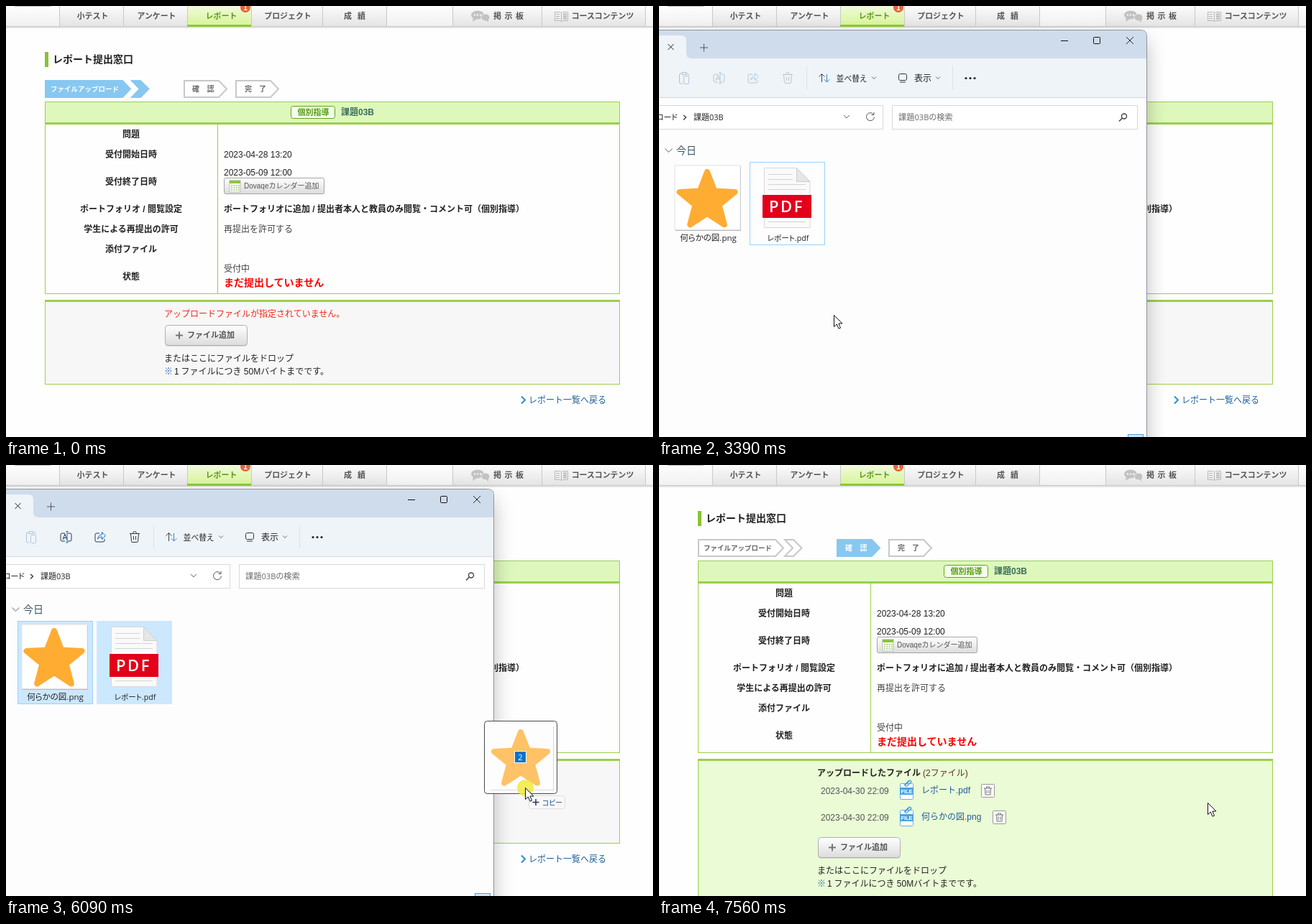
An HTML page that plays this animation: 900 by 600 pixels, repeating every 8 s.

```html
<!DOCTYPE html>
<html lang="ja">
<head>
<meta charset="utf-8">
<title>レポート提出</title>
<style>
html, body { margin: 0; width: 100%; height: 100%; overflow: hidden; background: #fefefe; }
svg { display: block; width: 900px; height: 600px; }
text { font-family: "Liberation Sans", "Noto Sans CJK JP", "Noto Sans CJK", sans-serif; white-space: pre; }
.b { font-weight: bold; }
.m { text-anchor: middle; }
.p { font-family: "Open Sans", "Noto Sans CJK JP", "Noto Sans CJK", sans-serif; font-feature-settings: "palt"; }
</style>
</head>
<body>
<svg id="stage" viewBox="0 0 900 600" xmlns="http://www.w3.org/2000/svg"></svg>
<script>
const GREEN = '#9bcf4c', BLUE = '#87c8f1', INK = '#222';

const text = (x, y, size, str, fill = INK, cls = '') =>
  `<text x="${x}" y="${y}" font-size="${size}" fill="${fill}" class="${cls}">${str}</text>`;
const rect = (x, y, w, h, fill, stroke = 'none', rx = 0, extra = '') =>
  `<rect x="${x}" y="${y}" width="${w}" height="${h}" fill="${fill}" stroke="${stroke}" rx="${rx}" ${extra}/>`;
const path = (d, stroke, fill = 'none', width = 1, extra = '') =>
  `<path d="${d}" stroke="${stroke}" fill="${fill}" stroke-width="${width}" ${extra}/>`;
const group = (id, body) => `<g id="${id}">${body}</g>`;
const gradient = (id, top, bottom) =>
  `<linearGradient id="${id}" x2="0" y2="1"><stop stop-color="${top}"/><stop offset="1" stop-color="${bottom}"/></linearGradient>`;

function star(cx, cy, r, fill) {
  const points = Array.from({ length: 10 }, (_, i) => {
    const a = i * Math.PI / 5, d = i % 2 ? r * .43 : r;
    return `${(cx + d * Math.sin(a)).toFixed(1)},${(cy - d * Math.cos(a)).toFixed(1)}`;
  });
  return `<polygon points="${points.join(' ')}" fill="${fill}" stroke="${fill}" stroke-width="8" stroke-linejoin="round"/>`;
}

function navigation() {
  const tab = (x, w, label, active) =>
    rect(x + .5, -2.5, w, 31, `url(#${active ? 'activeTab' : 'tab'})`, '#c9c9c9') +
    (active ? rect(x, 26, w + 1, 3, '#8cc63a') : '') + label;
  const name = (x, str, color = '#555') => text(x, 18, 10.9, str, color, 'b m');
  const bubbles = '<g fill="#c2c2c2"><ellipse cx="656" cy="12.5" rx="9" ry="6"/><path d="M650 16l-1 6 6-4z"/>' +
    '<g stroke="#f2f2f2"><ellipse cx="667" cy="16" rx="6" ry="5"/></g><path d="M668 20l3 3v-5z"/></g>' +
    '<g fill="#f5f5f5">' + [652, 656, 660].map(x => `<circle cx="${x}" cy="12.5" r="1.2"/>`).join('') + '</g>';
  const book = path('M763.5 8.5h7l2 1.5 2-1.5h7v12h-7l-2 1-2-1h-7zM772.5 10v11M765 11.5h5M765 14.5h5M765 17.5h5', '#b8b8b8') +
    path('M775 11.5h5M775 14.5h5M775 17.5h5', '#b8b8b8', 'none', 2);
  return rect(0, 0, 900, 28, 'url(#strip)') + rect(0, 28, 900, 1.5, '#c6c6c6') + rect(0, 29.5, 900, 1.5, '#e6e6e6') +
    rect(12, 0, 50, 1, '#bbb') +
    tab(74, 89, name(120.5, '小テスト')) + tab(163, 89, name(209.5, 'アンケート')) +
    tab(252, 89, name(299.5, 'レポート', '#5d9a1c'), true) +
    tab(341, 99, name(392, 'プロジェクト')) +
    tab(440, 89, text('470 489', 18, 11, '成績', '#555', 'b')) +
    tab(621, 124, bubbles + text('678 693.5 709', 18, 11, '掲示板', '#555', 'b')) +
    tab(745, 144, book + name(830, 'コースコンテンツ')) +
    '<circle cx="333" cy="2" r="7" fill="#e5663c"/>' + text(333, 6, 10, '1', '#fff', 'b m');
}

function steps(uploaded) {
  const shape = (d, on) => path(d, on ? BLUE : '#c8c8c8', on ? BLUE : '#fff', 2);
  const tone = on => on ? '#fff' : '#666';
  return shape('M55 104H162L173 115.5 162 127H55Z', !uploaded) +
    shape('M175 104H187L198.5 115.5 187 127H175L186 115.5Z', !uploaded) +
    text(62, 118.5, 9.5, 'ファイルアップロード', tone(!uploaded), 'b') +
    shape('M248 104H296L307 115.5 296 127H248Z', uploaded) +
    text('259 279.5', 119, 10, '確認', tone(uploaded), 'b') +
    shape('M320 104H368L379 115.5 368 127H320Z', false) +
    text('332 352', 119, 10, '完了', '#666', 'b');
}

function details() {
  const labels = [['問題', 183], ['受付開始日時', 211], ['受付終了日時', 249], ['ポートフォリオ / 閲覧設定', 287],
    ['学生による再提出の許可', 315], ['添付ファイル', 343], ['状態', 381]];
  const calendar = rect(311, 243, 15, 16, '#fff', '#bbb') + rect(311, 243, 15, 4, '#8cc63a') +
    path('M313 250h12M313 253h12M313 256h12', '#9cc96a', 'none', 1.5, 'stroke-dasharray="2 1.3"');
  return rect(54, 64, 5, 21, '#88c431') + text(65, 79, 14, 'レポート提出窓口', INK, 'b') +
    rect(54.5, 133.5, 799, 30, '#def8bb', GREEN) + rect(54.5, 164.5, 799, 236, '#fefefe', GREEN) +
    rect(54, 162, 800, 3, GREEN) + path('M294.5 165V401', GREEN) +
    rect(396.5, 139.5, 61, 17, '#f6fdea', '#62a31c', 3) + text(427.5, 152, 11, '個別指導', '#4f9a10', 'b m') +
    text(466, 152, 12, '課題03B', '#3b6e5a', 'b') +
    labels.map(([s, y]) => text(174, y, 12, s, INK, 'b m')).join('') +
    text(303, 211, 12, '2023-04-28 13:20') + text(303, 236, 12, '2023-05-09 12:00') +
    rect(303.5, 239.5, 139, 22, 'url(#button)', '#a5a5a5', 2) + calendar +
    text(331, 254, 10, 'Dovaqeカレンダー追加', '#555') +
    text(303, 287, 12, 'ポートフォリオに追加 / 提出者本人と教員のみ閲覧・コメント可（個別指導）', INK, 'b') +
    text(303, 315, 12, '再提出を許可する', '#444') + text(303, 370, 12, '受付中', '#444') +
    text(303, 390, 14, 'まだ提出していません', '#f00', 'b');
}

const panelFrame = (id, h) =>
  rect(54.5, 410.5, 799, h, '#f7f7f7', GREEN, 0, `id="${id}"`) + rect(54, 409, 800, 3, GREEN);

const addButton = dy => `<g transform="translate(0 ${dy})">` +
  rect(221.5, 445.5, 114, 28, '#bbb', 'none', 4) + rect(221.5, 444.5, 114, 28, 'url(#button)', '#b0b0b0', 4) +
  path('M236 458.5h10M241 453.5v10', '#777', 'none', 2) + text(252, 462, 11, 'ファイル追加', '#555', 'b') +
  text(220, 495, 12, 'またはここにファイルをドロップ') +
  text(220, 513, 12, '<tspan fill="#2b6ca8">※</tspan><tspan x="234">1</tspan><tspan x="243.5">ファイルにつき 50Mバイトまでです。</tspan>') + '</g>';

const dropPanel = () => panelFrame('dropBox', 116) +
  rect(61, 416, 787, 105, '#f3fde8', 'none', 0, 'id="glow"') +
  text(220, 433, 12, 'アップロードファイルが指定されていません。', '#f02818') + addButton(0) +
  path('M717 543.5l5 5-5 5', '#2a8fd5', 'none', 2) + text(727, 553, 12, 'レポート一覧へ戻る', '#1f5f96');

function filesPanel() {
  const row = (dy, name, binX) => `<g transform="translate(0 ${dy})">` + text(225, 458, 12, '2023-04-30 22:09', '#555') +
    rect(335.5, 443.5, 18, 22, '#fff', '#68aee0', 1) + rect(335, 449, 19, 10, '#4aa3e0') +
    text(344.5, 457, 7.5, 'FILE', '#fff', 'b m') +
    path('M341 446l6-6q3-2 4 1l-6 6q-3 1-2-2l5-5', '#3d9bd9', 'none', 1.2) +
    text(365, 457, 12, name, '#1e5c99') +
    `<g transform="translate(${binX} 444)">` + rect(.5, .5, 18, 18, '#fbfbfb', '#999', 1) +
    path('M4 6h11M7.5 6v-2h4v2M5.5 6l.5 9h7l.5-9M8 8.5v4.5M11 8.5v4.5', '#777') + '</g></g>';
  return panelFrame('filesBox', 220) +
    text(220, 433, 12, 'アップロードしたファイル', INK, 'b') + text(367, 433, 12, '(2ファイル)', '#5c3324') +
    row(0, 'レポート.pdf', 448) + row(37, '何らかの図.png', 464) + addButton(74);
}

function explorer() {
  const chevron = (x, y, s) => path(`M${x - s} ${y - s / 2}l${s} ${s} ${s} ${-s}`, '#666');
  const cross = (x, y, s) => path(`M${x - s} ${y - s}l${2 * s} ${2 * s}M${x - s} ${y + s}l${2 * s} ${-2 * s}`, INK);
  const icons = (line, accent) =>
    path('M82 95h-4q-2 0-2 2v7q0 2 2 2h4M86 95h3q2 0 2 2v7q0 2-2 2h-3M79 104l3-8 3 8M80 101.5h4', line) +
    path('M85 92.5v15.5M83.5 92.5h3M83.5 108h3', accent) +
    path('M130 95h-4q-2 0-2 2v8q0 2 2 2h9q2 0 2-2v-2', line) + path('M127.5 103q1-6 6-6v-3.5l5 5-5 5v-3.5q-4 0-6 3z', accent) +
    path('M172 95.5h14M176.5 95.5q0-3 2.5-3t2.5 3M173.5 95.5l1 11q0 1 1.5 1h6q1.5 0 1.5-1l1-11M177.5 99v5M180.5 99v5', line);
  const pdf = path('M146.5 225.5H191.5L210 244.5V308.5H146.5Z', '#d8d8d8', '#fafafa') +
    path('M191.5 225.5V244.5H210Z', '#cfcfcf', '#e6e6e6') +
    path('M152 234.5h34M152 241.5h34M152 248.5h52M152 255.5h52M152 300.5h52', '#d3d3d3') +
    rect(144, 263, 68, 32, '#e2001a') +
    `<text x="153" y="287" font-size="22" fill="#fff" letter-spacing="2.5" style="font-family:'Open Sans','Noto Sans',sans-serif;font-weight:600">PDF</text>`;
  return path('M-60 48H670Q678.5 48 678.5 56V660H-60Z', 'none', '#000', 0, 'id="shade" filter="url(#blur)"') +
    path('M-5 33.5H670Q678.5 33.5 678.5 42V640H-5Z', '#8e959c', '#fdfdfd') +
    path('M0 34H670Q678 34 678 42V73H0Z', 'none', '#e7e7e7', 0, 'id="titleBar"') +
    group('ribbon', '<path d="M0 41H31Q38 41 38 48V66Q38 73 45 73H0Z"/><rect y="73" width="678" height="54"/>') +
    rect(0, 127, 678, 1, '#d6d9dd') +
    cross(16.5, 57, 4) + path('M57 58h11M62.5 52.5v11', '#555') +
    path('M559 48.5h10', '#111') + rect(604.5, 43.5, 9, 9, 'none', '#111', 1) + cross(655, 48, 5) +
    path('M32 94h-2q-1.5 0-1.5 2v10q0 2 1.5 2h3M38 94h1.5q1.5 0 1.5 2v1M32 92.5h6v3h-6z', '#b8c2ca') +
    rect(34.5, 97.5, 7, 11, 'none', '#a9cbe6', 1) +
    group('iconsOff', icons('#bcc6cd', '#a9cbe6')) + group('iconsOn', icons('#2d3a46', '#0f6cbd')) +
    path('M205.5 84v32M408.5 84v32', '#dde1e5') +
    path('M226.5 106v-11M222.5 98.5l4-4 4 4', '#345') + path('M233.5 95v11M229.5 102l4 4 4-4', '#2e86c8') +
    text(246.5, 104.5, 10.8, '並べ替え', INK, 'p') + chevron(299, 100, 3) +
    rect(333.5, 94.5, 11, 9, 'none', '#333', 2) + path('M335 106h8', '#333') +
    text(355, 105, 12, '表示', INK, 'p') + chevron(388, 100, 3) +
    [427, 433, 439].map(x => `<circle cx="${x}" cy="100.5" r="1.6" fill="#222"/>`).join('') +
    rect(-5.5, 138.5, 317, 33, '#fff', '#d9d9d9') + rect(324.5, 138.5, 341, 33, '#fff', '#d9d9d9') +
    text(-4, 158.5, 10.8, 'ロード', INK, 'p') + path('M34 152l3.5 3-3.5 3.5', '#333', 'none', 1.3) +
    text(48, 158.5, 11, '課題03B', INK, 'p') + chevron(261, 154, 4) +
    path('M298.5 151a5.5 5.5 0 1 0 1 3.5M299 148v3.5h-3.5', '#555') +
    text(333, 158.5, 11.2, '課題03Bの検索', '#6a6a6a', 'p') +
    '<circle cx="647" cy="153.5" r="3.5" fill="none" stroke="#444" stroke-width="1.4"/>' + path('M644.5 156l-4.5 4.5', '#444', 'none', 1.6) +
    chevron(13.5, 201, 5) + text(24, 206, 14, '今日', '#3c5566', 'p') +
    rect(16.5, 217.5, 104, 115, '#cce8ff', '#99d1ff', 0, 'id="starItem"') +
    rect(126.5, 217.5, 104, 115, 'none', '#99d1ff', 0, 'id="pdfItem"') +
    rect(23, 223, 91, 90, '#bbb') + rect(22, 222, 91, 89.5, '#fff', '#e2e2e2') + star(67, 271.5, 40.5, '#ffac33') +
    pdf + text(68.5, 327, 11.5, '何らかの図.png', INK, 'p m') + text(179.5, 326.5, 10.6, 'レポート.pdf', INK, 'p m') +
    rect(652.5, 596.5, 21, 8, '#cfe6f8', '#5b9bd0') +
    rect(0, 0, 0, 0, 'rgba(0,100,210,.34)', '#0a74cc', 0, 'id="marquee"');
}

function pointer() {
  const ghost = rect(-56.5, -92.5, 101, 101, '#fdfdfd', '#4a4a4a', 4) + rect(-48, -85, 88, 89, '#d9d9d9') +
    rect(-49, -86, 88, 89, '#fdfdfd') + star(-6, -38, 39, '#ffc266') +
    rect(-14.5, -50.5, 16, 16, '#0a73c9', '#fff') + text(-6.5, -38.5, 11, '2', '#fff', 'm p');
  return group('ghost', ghost) +
    '<circle id="halo" r="11.5" cx=".5" cy=".5" fill="#f2ea3c" opacity=".85"/>' +
    group('denied', '<circle cx="16" cy="21.5" r="5.5" fill="none" stroke="#d97a52" stroke-width="1.4"/>' + path('M12.5 18l7 7', '#d97a52', 'none', 1.4)) +
    group('copy', rect(5.5, 11.5, 50, 18, '#f8f8f8', '#dedede', 3) + path('M10.5 20.5h9M15 16v9', '#223a55', 'none', 1.5) +
      text(24, 24.5, 9.8, 'コピー', '#1c4c86', 'p')) +
    path('M.5 .5V16.5L4.3 13 7 19.2 9.5 18.1 6.9 12H12Z', '#111', '#fff');
}

const stage = document.getElementById('stage');
stage.innerHTML = '<defs>' + gradient('strip', '#fdfdfd', '#f1f1f1') + gradient('tab', '#fdfdfd', '#e4e4e4') +
  gradient('activeTab', '#f3f9e4', '#d6f594') + gradient('button', '#fff', '#dcdcdc') +
  '<filter id="blur" filterUnits="userSpaceOnUse" x="-100" y="-20" width="900" height="720"><feGaussianBlur stdDeviation="14"/></filter></defs>' +
  rect(0, 0, 900, 600, '#fefefe') + details() +
  group('before', steps(false) + dropPanel()) + group('after', steps(true) + filesPanel()) +
  navigation() + group('explorer', explorer()) + group('pointer', pointer());

const ui = {};
stage.querySelectorAll('[id]').forEach(el => ui[el.id] = el);
const show = (el, on) => el.setAttribute('display', on ? 'inline' : 'none');
const set = (el, attrs) => Object.entries(attrs).forEach(([k, v]) => el.setAttribute(k, v));
const mix = (a, b, k) => `rgb(${a.map((v, i) => Math.round(v + (b[i] - v) * k))})`;
const clamp = (v, low, high) => Math.min(high, Math.max(low, v));

// Bursts of motion: start, end, number of steps
const BURSTS = [[470, 1220, 11], [1290, 1500, 4], [2160, 2440, 5], [2970, 3610, 10], [3810, 4560, 12],
  [4700, 4980, 5], [5250, 6020, 12], [6090, 6350, 5], [6550, 6550, 1], [7440, 7560, 3]];
// Pointer keys: time, x, y
const KEYS = [[470, 870, 573], [695, 735, 438], [920, 535, 350], [1080, 405, 332], [1220, 314, 362], [1430, 23, 521],
  [2970, 31, 522], [3180, 150, 470], [3400, 290, 410], [3610, 365, 380], [3810, 365, 380], [3960, 300, 362],
  [4150, 186, 325], [4220, 159, 315], [4400, 95, 289], [4560, 63, 272], [5390, 63, 272], [5530, 150, 292],
  [5740, 420, 356], [5880, 565, 399], [6020, 678, 431], [6090, 722, 449], [6160, 748, 462], [6290, 769, 472],
  [6549, 769, 472], [6550, 763, 470]];

function stepTime(t) {
  const burst = BURSTS.filter(b => t >= b[0]).pop();
  if (!burst) return 0;
  const [start, end, count] = burst;
  if (t >= end) return end;
  const step = (end - start) / (count - 1);
  return start + Math.floor((t - start) / step + .001) * step;
}

function pointerAt(t) {
  const i = KEYS.findIndex(k => k[0] > t);
  if (i < 0) return KEYS[KEYS.length - 1].slice(1);
  if (i === 0) return KEYS[0].slice(1);
  const [t0, x0, y0] = KEYS[i - 1], [t1, x1, y1] = KEYS[i], k = (t - t0) / (t1 - t0);
  return [x0 + (x1 - x0) * k, y0 + (y1 - y0) * k];
}

function draw(time) {
  const t = stepTime(time), between = (a, b) => t >= a && t < b;
  const [x, y] = pointerAt(t);
  const dragging = between(5250, 6550), uploaded = t >= 7440;

  show(ui.pointer, between(470, 1499) || t >= 2970);
  ui.pointer.setAttribute('transform', `translate(${Math.round(x)} ${Math.round(y)})`);
  show(ui.halo, between(3810, 4700) || between(4979, 6550));
  show(ui.ghost, dragging);
  show(ui.denied, dragging && x < 690);
  show(ui.copy, dragging && x >= 690);

  show(ui.explorer, between(2160, 6550));
  const focus = clamp((t - 2160) / 140, 0, 1);
  ui.titleBar.setAttribute('fill', mix([231, 231, 231], [207, 220, 236], focus));
  ui.ribbon.setAttribute('fill', mix([246, 246, 246], [239, 244, 249], focus));
  ui.shade.setAttribute('opacity', .18 + .08 * focus);

  // The selection box trails the pointer slightly and keeps its last corner
  const [mx, my] = pointerAt(clamp(t - 38, 3810, 4560)).map(Math.round);
  const pdfOn = mx < 231 && my < 333, starOn = mx < 121;
  show(ui.marquee, between(3811, 4700));
  set(ui.marquee, { x: mx + .5, y: my + .5, width: 365 - mx, height: Math.max(0, 379 - my) });
  show(ui.starItem, starOn);
  set(ui.pdfItem, { fill: pdfOn ? '#cce8ff' : 'none', stroke: starOn ? '#cce8ff' : '#99d1ff' });
  show(ui.iconsOn, pdfOn);
  show(ui.iconsOff, !pdfOn);

  show(ui.before, !uploaded);
  show(ui.after, uploaded);
  show(ui.glow, t >= 6550);
  ui.filesBox.setAttribute('fill', mix([243, 253, 232], [234, 251, 214], clamp((t - 7440) / 120, 0, 1)));
}

const begin = performance.now();
function frame() {
  draw((performance.now() - begin) % 8000);
  requestAnimationFrame(frame);
}
frame();
</script>
</body>
</html>
```
